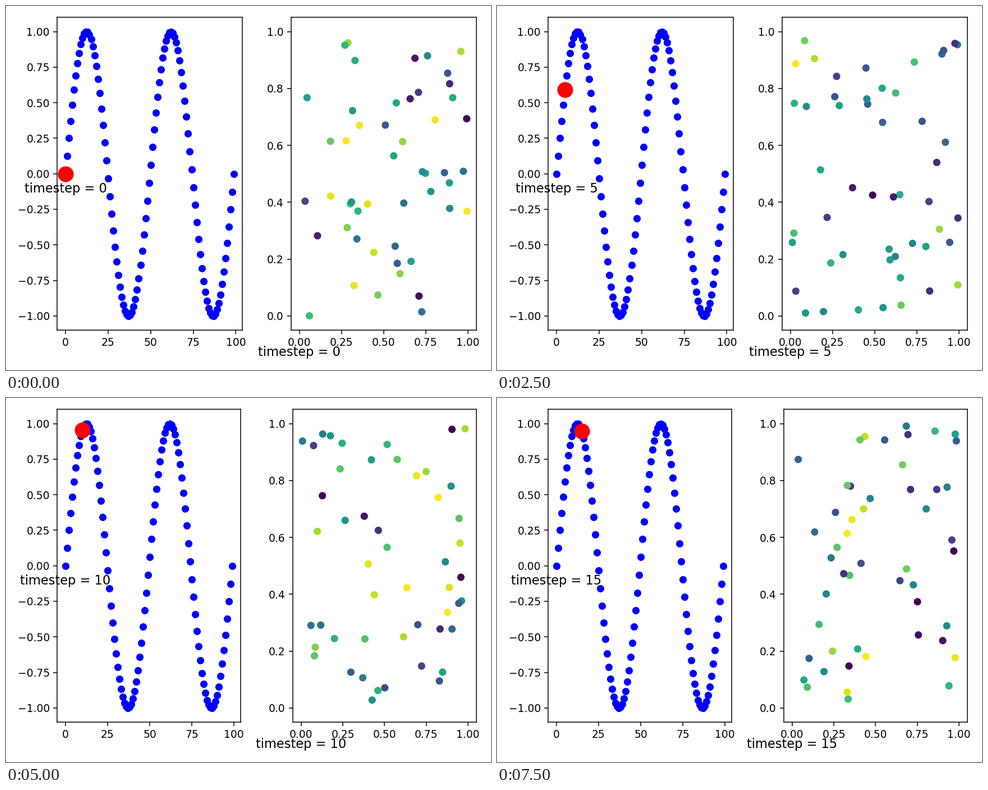
These frames come from a looping animation (864 by 648 pixels, 8000 ms). A matplotlib script:

```python
import matplotlib.pyplot as plt
import numpy as np
from matplotlib.animation import FuncAnimation

W, H, DPI = 864, 648, 135
STEPS, INTERVAL = 16, 500
POINTS = 50
TOP, BOTTOM = 20.25, 577.1
LEFT, RIGHT = 91, 837.9

plt.rcParams["font.family"] = "DejaVu Sans"
fig, (wave_ax, cloud_ax) = plt.subplots(1, 2, figsize=(W / DPI, H / DPI), dpi=DPI)

# Sine wave with a marker that runs along it
x = np.arange(100)
y = np.sin(np.linspace(0, 4 * np.pi, 100))
wave_ax.plot(x, y, "bo")
marker, = wave_ax.plot([0], [0], "ro", markersize=14)
wave_ax.set_xlim(-4.95, 103.95)
wave_ax.set_ylim(-1.0999, 1.0999)
wave_ax.set_xticks(np.arange(0, 101, 25))
wave_ax.set_yticks(np.linspace(-1, 1, 9))

# Random cloud, drawn anew at each step
cloud = cloud_ax.scatter(np.zeros(POINTS), np.zeros(POINTS),
                         c=np.linspace(0, 1, POINTS), cmap="viridis")
cloud_ax.set_xlim(-0.05, 1.05)
cloud_ax.set_ylim(-0.05, 1.05)
cloud_ax.set_xticks(np.linspace(0, 1, 5))
cloud_ax.set_yticks(np.linspace(0, 1, 6))

labels = [ax.text(0, -0.15, "", fontsize=12, ha="center", va="bottom")
          for ax in (wave_ax, cloud_ax)]


def place(ax, left, width):
    ax.set_position([left / W, 1 - BOTTOM / H, width / W, (BOTTOM - TOP) / H])


def update(step):
    # Two-digit labels need a wider gap between the plots
    width = 330.4 if step < 10 else 327.1
    place(wave_ax, LEFT, width)
    place(cloud_ax, RIGHT - width, width)

    marker.set_data([x[step]], [y[step]])

    rng = np.random.default_rng(100 + step)
    values = rng.random(POINTS)
    cloud.set_offsets(rng.random((POINTS, 2)))
    cloud.set_array(values)
    cloud.set_clim(values.min(), values.max())

    for label in labels:
        label.set_text(f"timestep = {step}")
    return [marker, cloud, *labels]


anim = FuncAnimation(fig, update, frames=STEPS, interval=INTERVAL,
                     init_func=lambda: update(0), repeat=True, repeat_delay=0)
plt.show()
```
